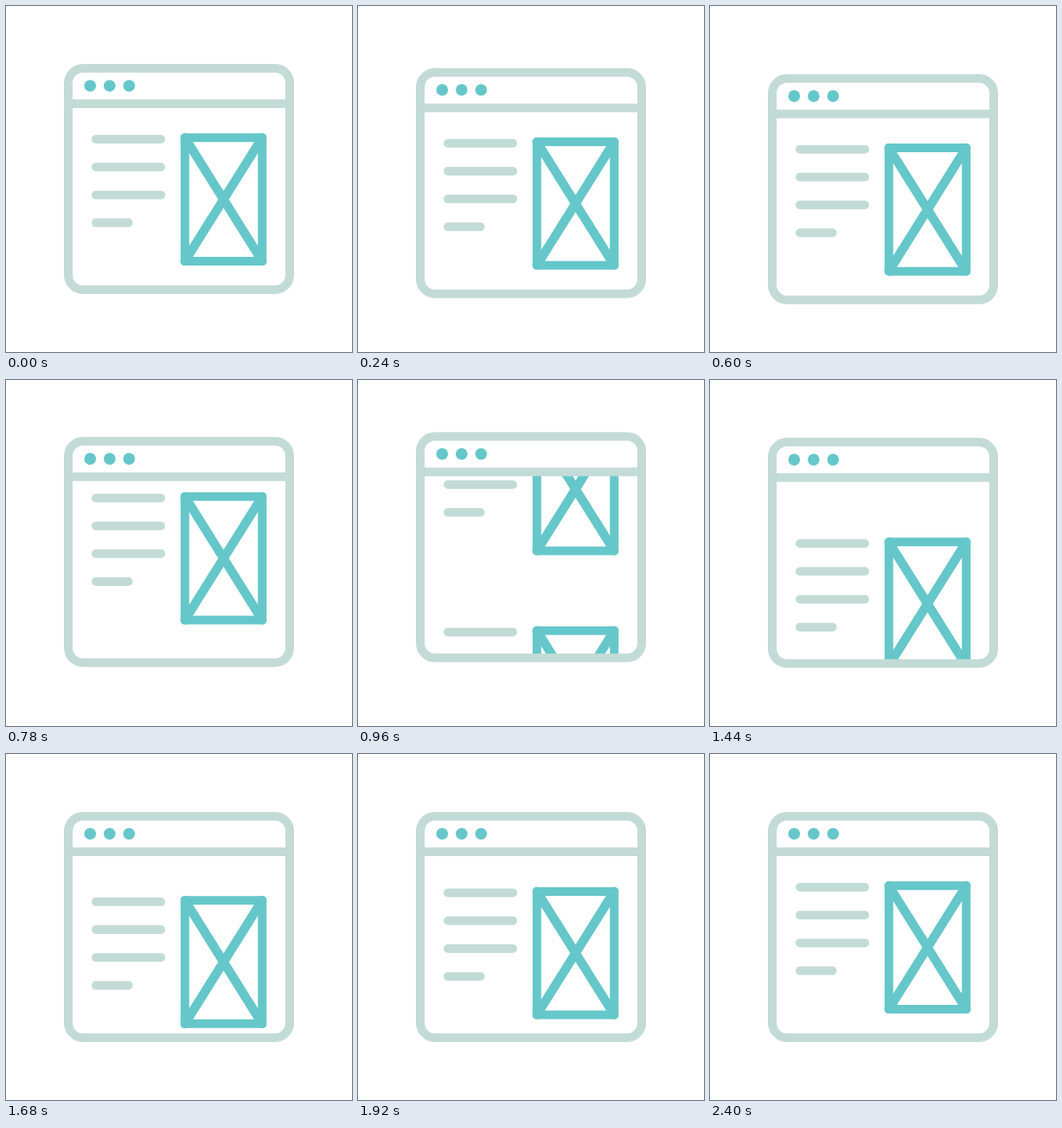
Animation, 400 px wide and 400 px high, one loop 3.09 s. Source, as an HTML page:

```html
<!DOCTYPE html>
<html lang="en">
<head>
<meta charset="utf-8">
<title>Scrolling browser window</title>
<style>
  html, body { margin: 0; width: 100%; height: 100%; overflow: hidden; background: #fff; }
  svg { display: block; width: 100%; height: 100%; }
  .pale { stroke: #c3dbd6; }
  .teal { stroke: #65c7c9; }
</style>
</head>
<body>
<svg viewBox="0 0 400 400" fill="none" stroke-width="10" stroke-linecap="round" stroke-linejoin="round">
  <defs>
    <clipPath id="view"><rect x="72" y="113" width="256" height="215"/></clipPath>
    <g id="block">
      <path class="pale" d="M104 154H179M104 186.2H179M104 218.4H179M104 250.6H141.5"/>
      <path class="teal" stroke-width="10.5" d="M206.8 152.3L296.2 295M296.2 152.3L206.8 295"/>
      <rect class="teal" x="206.8" y="152.3" width="89.4" height="142.7"/>
    </g>
  </defs>
  <g id="win">
    <g clip-path="url(#view)">
      <g id="page">
        <use href="#block"/>
        <use href="#block" y="235"/>
      </g>
    </g>
    <rect class="pale" x="72" y="72" width="256" height="256" rx="17"/>
    <path class="pale" d="M72 113H328"/>
    <g fill="#65c7c9">
      <circle cx="97.3" cy="92.3" r="6.8"/>
      <circle cx="119.8" cy="92.3" r="6.8"/>
      <circle cx="142.3" cy="92.3" r="6.8"/>
    </g>
  </g>
</svg>
<script>
  const LOOP = 3090, STEP = 30, END = 2400, PAGE = 235;
  const win = document.getElementById('win');
  const page = document.getElementById('page');

  // Cubic easing with flat ends; x1 and x2 are the handle positions in time.
  function ease(u, x1, x2) {
    if (u <= 0) return 0;
    if (u >= 1) return 1;
    let lo = 0, hi = 1;
    for (let i = 0; i < 30; i++) {
      const s = (lo + hi) / 2, r = 1 - s;
      const x = 3 * s * r * r * x1 + 3 * s * s * r * x2 + s * s * s;
      if (x < u) lo = s; else hi = s;
    }
    return lo * lo * (3 - 2 * lo);
  }

  // Time and vertical offset of the window.
  const bob = [[0, 0], [570, 12.3], [900, -7], [1500, 0]];

  function bobAt(t) {
    for (let i = 1; i < bob.length; i++) {
      const [t0, y0] = bob[i - 1], [t1, y1] = bob[i];
      if (t < t1) return y0 + (y1 - y0) * ease((t - t0) / (t1 - t0), 1 / 3, 2 / 3);
    }
    return 0;
  }

  function draw(now) {
    const t = Math.min(END, Math.floor((now % LOOP) / STEP) * STEP);
    const scroll = PAGE * ease((t - 570) / (END - 570), 0.325, 0);
    win.setAttribute('transform', `translate(0 ${bobAt(t).toFixed(3)})`);
    page.setAttribute('transform', `translate(0 ${(-scroll).toFixed(3)})`);
  }

  const start = performance.now();
  function tick() {
    draw(performance.now() - start);
    requestAnimationFrame(tick);
  }
  tick();
</script>
</body>
</html>
```
